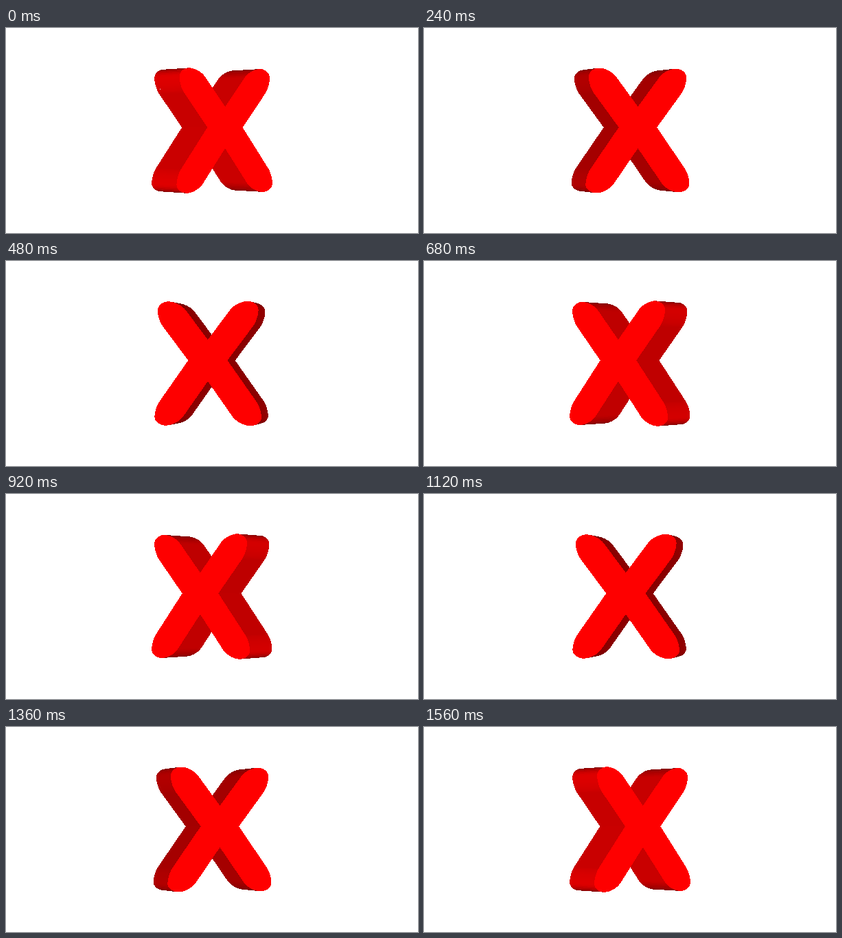
Recreate the animation shown at these times as an HTML page. Size 600 by 300 pixels, loop 1600 ms.

```html
<!DOCTYPE html>
<html lang="en">
<head>
<meta charset="utf-8">
<title>Swinging X</title>
<style>
  html, body { margin: 0; width: 100%; height: 100%; overflow: hidden; background: #fff; }
  svg { display: block; }
</style>
</head>
<body>
<svg id="stage" width="600" height="300" shape-rendering="crispEdges"></svg>
<script>
const stage = document.getElementById('stage');

const LOOP = 1600, STEP = 40;
const SWING = 27 * Math.PI / 180;
const HALF_DEPTH = 41.5;
const CAMERA = 2800;

// Letter proportions, measured from its centre.
const HALF_HEIGHT = 89.6;
const SIDE_NOTCH = [-28.5, -4.5];
const TOP_NOTCH = [0, -34.3];
const BOTTOM_NOTCH = [0, 25.7];

const middle = (a, b) => [(a[0] + b[0]) / 2, (a[1] + b[1]) / 2];
const distance = (a, b) => Math.hypot(a[0] - b[0], a[1] - b[1]);

function toward(from, to, length) {
  const k = length / distance(from, to);
  return from.map((v, axis) => v + (to[axis] - v) * k);
}

// Elliptical arc from a to b, tangent to both sides of the corner.
function roundCorner(a, corner, b, segments = 12) {
  return Array.from({ length: segments + 1 }, (_, i) => {
    const t = i / segments * Math.PI / 2;
    return corner.map((c, axis) =>
      c + (1 - Math.sin(t)) * (a[axis] - c) + (1 - Math.cos(t)) * (b[axis] - c));
  });
}

// Rounded end of a left arm, traced from its inner edge to its outer edge.
// Both edges share a slope; direction is -1 for the upper arm, 1 for the lower.
function armEnd(notch, reach, slope, direction) {
  const end = direction * HALF_HEIGHT;
  const inner = [-(end - notch[1]) * direction / slope, end];
  const tip = [-reach, end];
  const outer = [-reach, SIDE_NOTCH[1] + direction * slope * (reach + SIDE_NOTCH[0])];
  const cap = middle(inner, tip), side = middle(tip, outer);
  return [
    ...roundCorner(toward(inner, notch, distance(inner, cap)), inner, cap),
    ...roundCorner(cap, tip, side),
    ...roundCorner(side, outer, toward(outer, SIDE_NOTCH, distance(outer, side)))
  ];
}

const left = [
  TOP_NOTCH,
  ...armEnd(TOP_NOTCH, 73.1, 1.33, -1),
  SIDE_NOTCH,
  ...armEnd(BOTTOM_NOTCH, 77.5, 1.42, 1).reverse(),
  BOTTOM_NOTCH
];
const right = left.slice(1, -1).reverse().map(([x, y]) => [-x, y]);
const outline = [...left, ...right].filter((p, i, all) => i === 0 || distance(p, all[i - 1]) > 0.01);

function project([x, y], z, sin, cos) {
  const scale = CAMERA / (CAMERA - (z * cos - x * sin));
  return [300 + (x * cos + z * sin) * scale, 150 + y * scale];
}

function polygon(points, facing) {
  const red = Math.min(254, Math.round(108 + 253 * facing));
  const path = points.map(p => p.map(v => v.toFixed(2))).join(' ');
  return `<polygon points="${path}" fill="rgb(${red},0,0)"/>`;
}

function draw(time) {
  const angle = SWING * Math.cos(2 * Math.PI * time / LOOP);
  const sin = Math.sin(angle), cos = Math.cos(angle);
  const front = outline.map(p => project(p, HALF_DEPTH, sin, cos));
  const back = outline.map(p => project(p, -HALF_DEPTH, sin, cos));

  const walls = outline.map((a, i) => {
    const j = (i + 1) % outline.length, b = outline[j];
    return {
      corners: [front[i], front[j], back[j], back[i]],
      facing: sin * (b[1] - a[1]) / distance(a, b),
      depth: -(a[0] + b[0]) * sin
    };
  }).filter(wall => wall.facing > 0).sort((a, b) => a.depth - b.depth);

  stage.innerHTML = walls.map(wall => polygon(wall.corners, wall.facing)).join('')
    + polygon(front, cos);
}

function tick() {
  const time = performance.now() % LOOP;
  draw(Math.floor(time / STEP) * STEP);
  requestAnimationFrame(tick);
}
tick();
</script>
</body>
</html>
```
